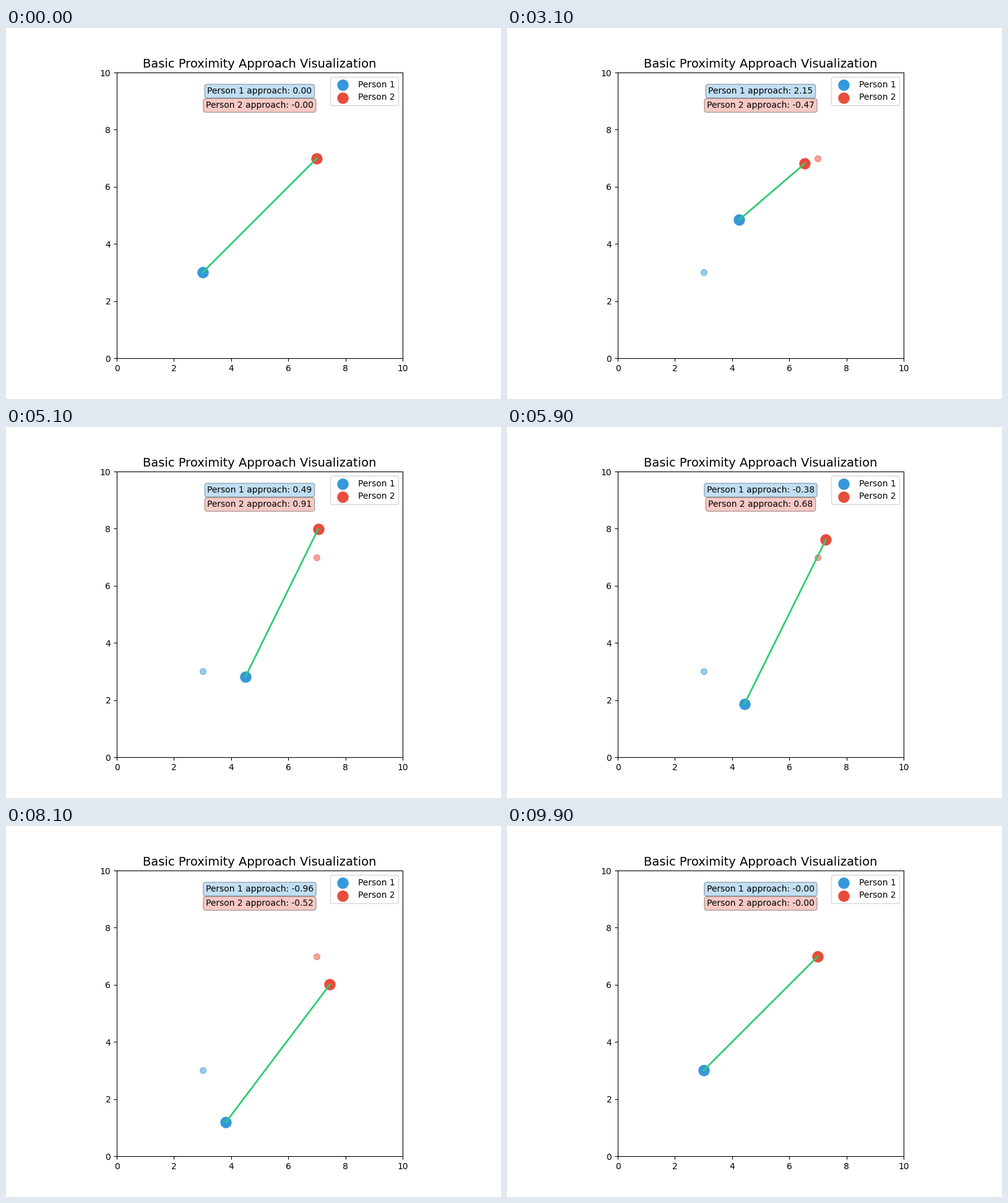
These frames come from a looping animation (800x600 px, 10000 ms). A matplotlib script:

```python
import numpy as np
import matplotlib.pyplot as plt
from matplotlib.animation import FuncAnimation

FRAMES = 100
INTERVAL = 100
BLUE, RED, GREEN = "#3498db", "#e74c3c", "#2ecc71"
HOME1 = np.array([3.0, 3.0])
HOME2 = np.array([7.0, 7.0])
TIMES = np.linspace(0, 2 * np.pi, FRAMES)

fig, ax = plt.subplots(figsize=(8, 6), dpi=100)
ax.set_xlim(0, 10)
ax.set_ylim(0, 10)
ax.set_aspect("equal")
ax.set_title("Basic Proximity Approach Visualization", fontsize=14)


def add_person(home, color, name):
    ax.scatter(*home, s=50, color=color, alpha=0.5)
    return ax.scatter(*home, s=150, color=color, label=name)


def add_readout(y, color):
    return ax.text(0.5, y, "", transform=ax.transAxes, ha="center", va="top",
                   bbox=dict(boxstyle="round", facecolor=color, alpha=0.3))


dot1 = add_person(HOME1, BLUE, "Person 1")
dot2 = add_person(HOME2, RED, "Person 2")
link, = ax.plot([], [], color=GREEN, linewidth=2)
text1 = add_readout(0.95, BLUE)
text2 = add_readout(0.90, RED)
ax.legend(loc="upper right")


def along(move, unit):
    return move[0] * unit[0] + move[1] * unit[1]


def update(i):
    t = TIMES[i]
    move1 = np.array([1.5 * np.sin(t / 2), 2 * np.sin(t)])
    move2 = np.array([-0.5 * np.sin(t), -np.sin(1.5 * t)])
    p1, p2 = HOME1 + move1, HOME2 + move2
    unit = (p2 - p1) / np.linalg.norm(p2 - p1)

    dot1.set_offsets([p1])
    dot2.set_offsets([p2])
    link.set_data([p1[0], p2[0]], [p1[1], p2[1]])
    text1.set_text(f"Person 1 approach: {along(move1, unit):.2f}")
    text2.set_text(f"Person 2 approach: {along(move2, unit):.2f}")
    return dot1, dot2, link, text1, text2


anim = FuncAnimation(fig, update, frames=FRAMES, interval=INTERVAL, repeat=True)
plt.show()
```
